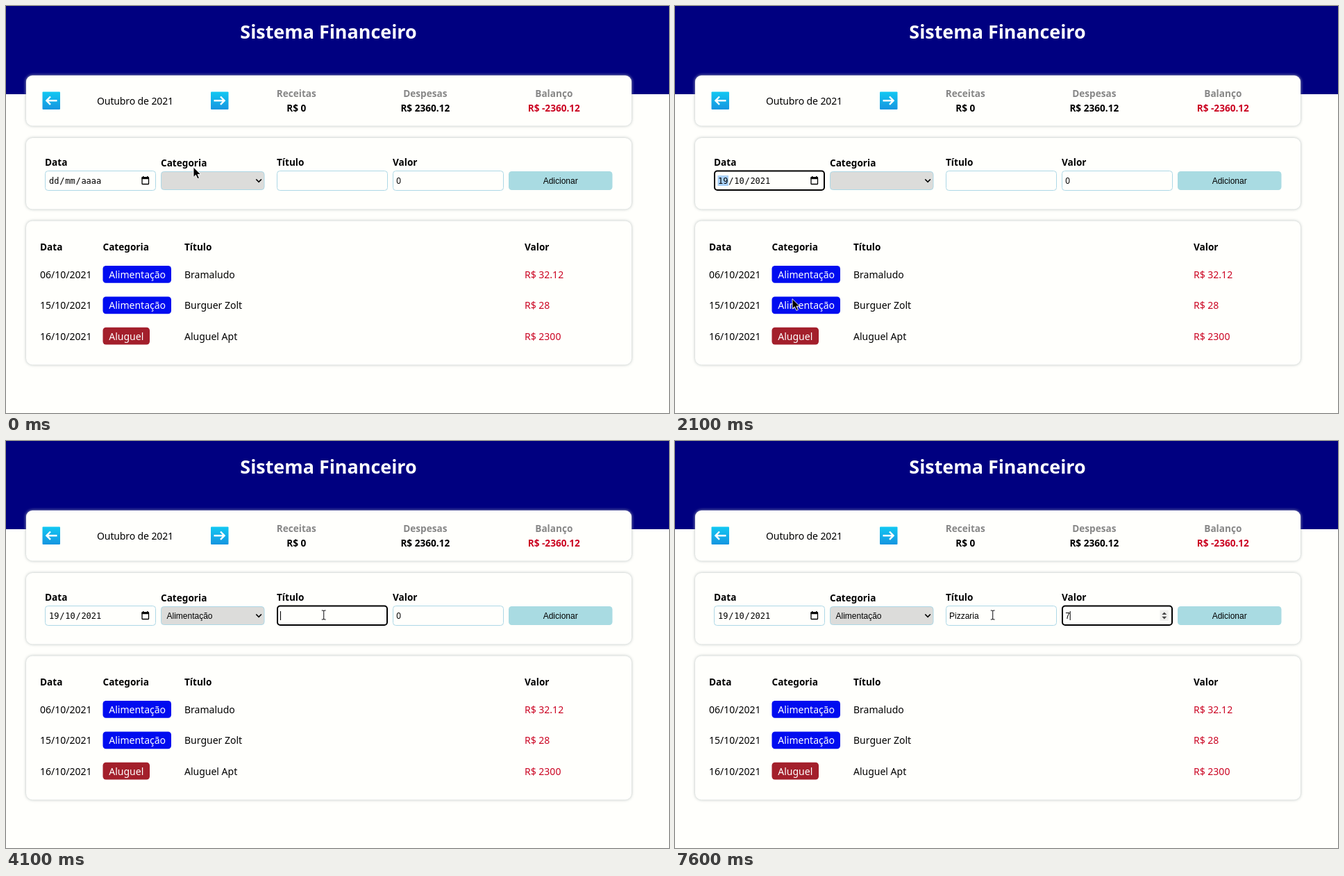
An HTML page for the animation above (8000 ms loop, 955x586 px).

```html
<!DOCTYPE html>
<html lang="pt-BR">
<head>
<meta charset="utf-8">
<title>Sistema Financeiro</title>
<style>
html, body { margin: 0; height: 100%; overflow: hidden; background: #fffffc }
svg { display: block; width: 100vw; height: 100vh }
text { font: 14px "Noto Sans", "Open Sans", sans-serif; white-space: pre }
.b { font-weight: 700; font-size: 13.6px }
.h1 { font-weight: 700; font-size: 26.9px; fill: #fff }
.ui { font: 12px "Liberation Sans", Arial, sans-serif }
.cal { font: 10.8px "Liberation Sans", Arial, sans-serif }
.calb { font: bold 10.8px "Liberation Sans", Arial, sans-serif }
.mono { font: 12px "DejaVu Sans Mono", monospace }
.mid { text-anchor: middle }
.card { fill: #fffffc; filter: drop-shadow(0 0 2.2px #b4bcbc) }
.pop { filter: drop-shadow(0 2px 3px #0005) }
.line { fill: none; stroke: #000 }
</style>
</head>
<body>
<svg viewBox="0 0 955 586">
  <defs>
    <linearGradient id="sky" x2="0" y2="1">
      <stop stop-color="#12c8f2"/><stop offset="1" stop-color="#1695e0"/>
    </linearGradient>
  </defs>
  <g id="page"></g>
  <g id="live"></g>
</svg>
<script>
const RED = '#cb0422', GREY = '#878787', PALE = '#add8e6', SELECTED = '#a9d1f8';
const page = document.getElementById('page'), live = document.getElementById('live');

const text = (x, y, s, cls = '', fill = '#000') =>
  `<text x="${x}" y="${y}" class="${cls}" fill="${fill}">${s}</text>`;
const rect = (x, y, w, h, fill, r = 0, more = '') =>
  `<rect x="${x}" y="${y}" width="${w}" height="${h}" rx="${r}" fill="${fill}" ${more}/>`;
const line = (d, w = 1, color = '#000') =>
  `<path class="line" d="${d}" style="stroke:${color};stroke-width:${w}"/>`;
const card = (y, h) => rect(29, y, 872, h, '#fffffc', 9, 'class="card"');
const caret = x => rect(x, 245, 1, 13, '#000');

function drawPage() {
  let s = rect(0, 0, 955, 127, '#000080') + text(464.5, 47, 'Sistema Financeiro', 'h1 mid');
  s = s.replace('fill="#000"', 'fill="#fff"');
  s += card(100, 72.5) + card(190, 102.5) + card(309.5, 207);

  // month picker and totals
  s += rect(52.5, 123.5, 25.5, 25.5, 'url(#sky)', 1) + rect(295, 123.5, 25.5, 25.5, 'url(#sky)', 1);
  s += line('M73.5 136.2H59M64 130.5l-5.6 5.7 5.6 5.7M299.5 136.2H314M309 130.5l5.6 5.7-5.6 5.7', 2.4, '#fff');
  s += `<g letter-spacing="-.12">${text(186, 142, 'Outubro de 2021', 'mid')}</g>`;
  [['Receitas', 'R$ 0', '#000'], ['Despesas', 'R$ 2360.12', '#000'], ['Balanço', 'R$ -2360.12', RED]]
    .forEach(([name, sum, color], i) => {
      const x = 418.3 + 185.5 * i;
      s += text(x, 131.3, name, 'b mid', GREY) + text(x, 151.5, sum, 'b mid', color);
    });

  // form
  ['Data', 'Categoria', 'Título', 'Valor'].forEach((name, i) =>
    s += text(56 + 167 * i, i == 1 ? 231 : 230, name, 'b'));
  s += rect(724, 238, 149.5, 27, '#a9dbe2', 4.5) + text(798.7, 256, 'Adicionar', 'ui mid');

  // table
  [[49, 'Data'], [139.5, 'Categoria'], [257, 'Título'], [747, 'Valor']]
    .forEach(([x, name]) => s += text(x, 351.5, name, 'b'));
  [['06/10/2021', 'Alimentação', 'Bramaludo', 'R$ 32.12'],
   ['15/10/2021', 'Alimentação', 'Burguer Zolt', 'R$ 28'],
   ['16/10/2021', 'Aluguel', 'Aluguel Apt', 'R$ 2300']]
    .forEach(([date, kind, title, sum], i) => {
      const y = 391.7 + 44.4 * i, rent = kind == 'Aluguel';
      s += text(49, y, date) + text(257, y, title) + text(747, y, sum, '', RED);
      s += rect(139.5, y - 17.7, rent ? 67.5 : 98.5, 24.8, rent ? '#a31f2b' : '#000cf0', 4.5);
      s += text(148.3, y, kind, '', '#fff');
    });
  page.innerHTML = s;
}

function field(x, focused) {
  return focused
    ? rect(x + 1, 237.5, 158, 27.5, '#fffffc', 4, 'stroke="#000" stroke-width="2"')
    : rect(x + .5, 237.5, 159, 28, '#fffffc', 4, `stroke="${PALE}"`);
}

function dateField(focused, day, month, year) {
  let s = field(56, focused);
  if (focused) s += rect(61.5, 244, 15.5, 15, SELECTED);
  [[62, day], [77.3, '/'], [85.2, month], [100.5, '/'], [108.4, year]]
    .forEach(([x, part]) => s += text(x, 256, part, 'mono'));
  return s + rect(196, 247, 9.5, 9.5, 'none', .5, 'stroke="#000" stroke-width="1.3"') +
    rect(195.5, 246.4, 10.5, 2.8, '#000') + rect(197, 245, 1.5, 2, '#000') + rect(203, 245, 1.5, 2, '#000');
}

function calendar() {
  let s = rect(56.5, 266, 192.5, 249, '#fffffc', 0, 'class="pop" stroke="#b8b8b8"');
  s += text(66, 289.5, 'outubro de 2021', 'calb') + '<path d="M152 284h6.4l-3.2 3.6z"/>';
  s += line('M199 294v-13.5M193 286.5l6-6 6 6M227.5 280v13.5M221.5 287.5l6 6 6-6', 1.1, '#333');
  const colX = c => 78 + 24.9 * c;
  [...'DSTQQSS'].forEach((d, c) => s += text(colX(c), 322.5, d, 'cal mid', '#222'));
  for (let i = 0; i < 42; i++) {
    const n = i - 4, other = n < 1 || n > 31, today = n == 19;
    const x = colX(i % 7), y = 344.2 + 24.9 * Math.floor(i / 7);
    if (today) s += rect(x - 11.5, y - 12, 23.5, 23.5, '#0f7bee', 1, 'stroke="#000" stroke-width="2"');
    s += text(x, y + 4, n < 1 ? n + 30 : n > 31 ? n - 31 : n, today ? 'calb mid' : 'cal mid',
      today ? '#fff' : other ? '#858585' : '#111');
  }
  return s + text(75.5, 500, 'Limpar', 'cal', '#0b7fb4') + text(208, 500, 'Hoje', 'cal', '#0b7fb4');
}

function dropdown(y) {
  const row = Math.max(0, Math.min(3, Math.floor((y - 265) / 14.8)));
  let s = rect(223, 265.3, 148.5, 60, '#f7f7f5', 0, 'class="pop" stroke="#777"');
  s += rect(223.5, 265.8 + 14.7 * row, 147.5, 14.7, '#1098f2');
  ['', 'Alimentação', 'Aluguel', 'Salário'].forEach((name, i) =>
    s += text(232, 276.5 + 14.7 * i, name, 'ui', i == row ? '#fff' : '#111'));
  return s;
}

// pointer stops: time, x, y
const stops = [
  [0, 270, 232], [100, 270, 232], [300, 236, 237], [600, 195, 248], [900, 195, 248],
  [1100, 232, 310], [1200, 243, 380], [1300, 225, 440], [1400, 170, 460], [1500, 133.5, 422.5],
  [2000, 133.5, 422.5], [2300, 240, 420], [2500, 290, 370], [2700, 270, 320], [2900, 226, 287],
  [3000, 299, 250.5], [3200, 299, 250.5], [3700, 304, 284], [3800, 335, 268],
  [3900, 405, 253], [4000, 453, 250.5], [4100, 457.7, 250.5], [8000, 457.7, 250.5]
];
function pointerAt(t) {
  const i = stops.findIndex(p => p[0] > t), [t0, x0, y0] = stops[i - 1], [t1, x1, y1] = stops[i];
  const k = (t - t0) / (t1 - t0);
  return [x0 + (x1 - x0) * k, y0 + (y1 - y0) * k];
}
function pointer(x, y) {
  const beam = 'M-3-6.5h2l1 1 1-1h2M0-5.5v11M-3 6.5h2l1-1 1 1h2';
  return `<g transform="translate(${x} ${y})">` + (x > 390
    ? line(beam, 2.4, '#fff') + line(beam, 1.1, '#222')
    : '<path d="M0 0v14.5l3.4-3.2 2.5 5.5 2.5-1.1-2.4-5.2h4.6z" stroke="#fff" stroke-width=".9"/>') + '</g>';
}

// typed letters: time, count so far, caret x
const keys = [[4000, 0, 395], [4900, 1, 402.5], [5200, 3, 411], [5400, 4, 417.5],
  [5500, 5, 424], [5700, 6, 428], [5800, 7, 431], [5900, 8, 437.5]];

function render(t) {
  const [x, y] = pointerAt(t);
  const chosen = t >= 2100, kind = t >= 3800, titled = t >= 4000 && t < 6500, valued = t >= 6500;
  let s = chosen ? dateField(t < 3200, '19', '10', '2021') : dateField(t >= 700, 'dd', 'mm', 'aaaa');

  s += rect(223.5, 238.5, 148.5, 26, '#dcdcda', 4, `stroke="${PALE}"`) + line('M360.3 249.5l3.8 3.8 3.8-3.8', 1.7);
  if (kind) s += text(231.5, 256, 'Alimentação', 'ui');

  s += field(390, titled);
  const key = keys.filter(k => k[0] <= t).pop();
  if (key) s += text(395, 256, 'Pizzaria'.slice(0, key[1]), 'ui');
  if (titled && !(t >= 4700 && t < 4900)) s += caret(key[2]);

  s += field(557, valued);
  if (valued) {
    s += rect(698.5, 243.5, 12.5, 15.5, '#efefed') + '<path d="M701.3 250l3.5-3.6 3.5 3.6zM701.3 252.8h7l-3.5 3.6z" fill="#444"/>';
    s += t < 7600 ? rect(562, 245, 7.5, 14, SELECTED) : caret(568.7);
  }
  s += text(562.3, 256, t < 7600 ? '0' : '7', 'ui');

  if (t >= 700 && !chosen) s += calendar();
  if (t >= 3200 && !kind) s += dropdown(y);
  live.innerHTML = s + pointer(x, y);
}

let last = -1;
function frame(now) {
  const t = Math.floor(now % 8000 / 100) * 100;
  if (t != last) render(last = t);
  requestAnimationFrame(frame);
}
drawPage();
render(0);
requestAnimationFrame(frame);
</script>
</body>
</html>
```
